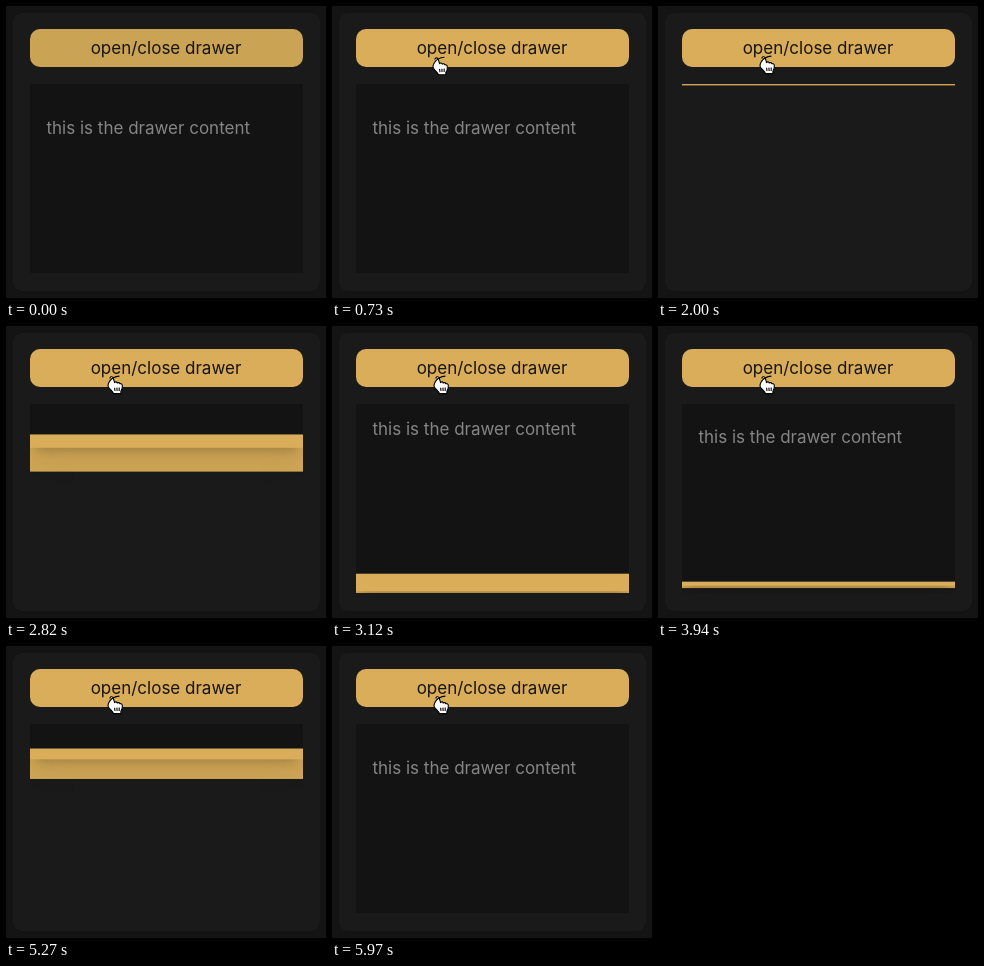
Write an HTML page that moves like this. It is 320x292 px and loops after 6 s.

```html
<!DOCTYPE html>
<html lang="en">
<head>
<meta charset="utf-8">
<title>Drawer</title>
<style>
  html, body { margin: 0; width: 100%; height: 100%; overflow: hidden; background: #141414; }
  body { position: relative; font: 17px/20px Inter, sans-serif; }
  body div, svg { position: absolute; }
  #card { left: 6.5px; top: 6.5px; width: 307px; height: 278.5px; border-radius: 9px; background: #1a1a1a; }
  #button {
    left: 23.5px; top: 23px; width: 273px; height: 38px; border-radius: 10px;
    color: #171512; line-height: 38px; text-align: center;
  }
  #drawer { left: 23.5px; top: 78px; width: 273px; height: 188.5px; overflow: hidden; }
  #drawer div { inset: 0; }
  #back { background: #cfa555; }
  #middle {
    background: #d9ad59;
    box-shadow: 0 20px 25px -5px rgba(0, 0, 0, .06), 0 8px 10px -6px rgba(0, 0, 0, .2);
  }
  #drawer #content { padding: 34px 17px; background: #131313; color: #858585; }
  #cursor { left: 0; top: 0; width: 18px; height: 22px; overflow: visible; }
  #cursor path { stroke-width: 1.1; stroke-linejoin: round; }
</style>
</head>
<body>
<div id="card"></div>
<div id="button">open/close drawer</div>
<div id="drawer">
  <div id="back"></div>
  <div id="middle"></div>
  <div id="content">this is the drawer content</div>
</div>
<svg id="cursor">
  <path id="arrow" fill="#000" stroke="#fff" d="M0 0V14L3.2 11L5.4 16L7.8 15L5.6 10.2H10Z"/>
  <g id="hand">
    <path fill="#fff" stroke="#000" d="M-1.9 1.6C-2.4-.4.6-1 1.2 1L2.6 5.6C3.2 4.5 4.9 4.7 5.3 6C6.1 5.2 7.6 5.6 7.9 6.8C9 6.3 10.1 7 10.3 8.2C10.6 10.5 10.2 12.5 8.9 14.3V16.6H1.5C.7 14.6-1.6 12.7-3.3 10.5C-4.9 8.4-3-.0 7.4-.9 8.8L-.2 9.4Z"/>
    <path fill="none" stroke="#000" d="M2.6 10.8L3 14M4.9 10.6L5.1 14M7.2 10.5V14"/>
  </g>
</svg>
<script>
const LOOP = 6000, HEIGHT = 188.5;
const MOVE_START = 240, MOVE_TIME = 620, HOVER_START = 560, HOVER_TIME = 150;
const CLICKS = [1431, 2655, 3872, 5122];
// Each layer: element, opening time, closing time
const layers = [['back', 400, 600], ['middle', 500, 500], ['content', 600, 400]]
  .map(([id, open, close]) => ({ el: byId(id), open, close }));

function byId(id) { return document.getElementById(id); }
const clamp = v => Math.min(1, Math.max(0, v));
const mix = (a, b, k) => a + (b - a) * k;

// cubic-bezier(.42, 0, .58, 1)
function easeInOut(x) {
  let lo = 0, hi = 1;
  for (let i = 0; i < 24; i++) {
    const s = (lo + hi) / 2, r = 1 - s;
    if (1.26 * s * r * r + 1.74 * s * s * r + s ** 3 < x) lo = s; else hi = s;
  }
  return lo * lo * (3 - 2 * lo);
}

function drawDrawer(t) {
  const count = CLICKS.filter(c => c <= t).length;
  const closing = count % 2 === 1;
  for (const { el, open, close } of layers) {
    let shown = 1;
    if (count) {
      const k = clamp((t - CLICKS[count - 1]) / (closing ? close : open));
      const p = k === 1 ? 1 : easeInOut(k);
      shown = closing ? 1 - p : p;
    }
    el.style.transform = `translateY(${(shown - 1) * HEIGHT}px)`;
    el.style.visibility = shown ? 'visible' : 'hidden';
  }
}

function drawPointer(t) {
  const p = 1 - (1 - clamp((t - MOVE_START) / MOVE_TIME)) ** 3;
  const x = mix(-9, 106, p), y = mix(174, 51, p);
  const over = y < 61;
  byId('cursor').style.display = t < MOVE_START ? 'none' : 'block';
  byId('cursor').style.transform = `translate(${x}px, ${y}px)`;
  byId('arrow').style.display = over ? 'none' : 'inline';
  byId('hand').style.display = over ? 'inline' : 'none';

  const h = clamp((t - HOVER_START) / HOVER_TIME);
  byId('button').style.background =
    `rgb(${mix(203, 217, h)}, ${mix(163, 173, h)}, ${mix(84, 89, h)})`;
}

const start = performance.now();
function frame() {
  const t = (performance.now() - start) % LOOP;
  drawDrawer(t);
  drawPointer(t);
  requestAnimationFrame(frame);
}
frame();
</script>
</body>
</html>
```
